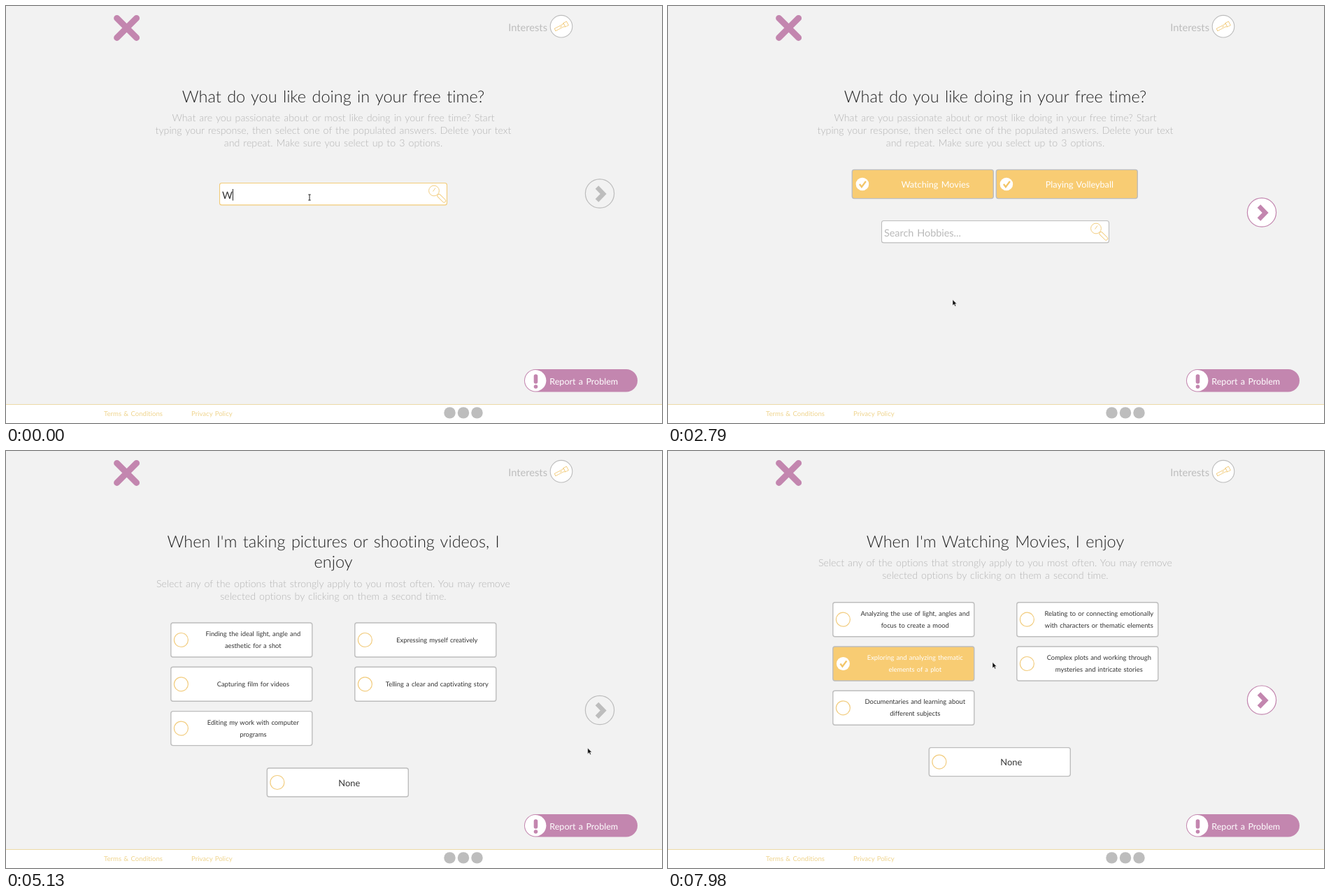
An HTML page for the animation above (8 s loop, 938 px wide and 597 px high).

```html
<!DOCTYPE html>
<html lang="en">
<head>
<meta charset="utf-8">
<title>Interests questionnaire</title>
<style>
  html, body { margin: 0; width: 100%; height: 100%; overflow: hidden; background: #f2f2f2; }
  svg { display: block; width: 100vw; height: 100vh; }
  text { font-family: Lato, "Open Sans", sans-serif; font-variant-ligatures: none; word-spacing: .085em; text-rendering: geometricPrecision; white-space: pre; }
  .mid { text-anchor: middle; }
  .title { font-size: 23.5px; font-weight: 300; fill: #222; }
  .sub { font-size: 14.2px; font-weight: 300; fill: #b4b4b4; }
  .option { font-size: 9.35px; fill: #333; }
  .none { font-size: 12.9px; fill: #333; }
  .hobby { font-size: 12.7px; fill: #fff; }
  .field { font-size: 14.4px; fill: #333; }
  .on { fill: #fff; }
  .link { font-size: 9.6px; fill: #efd48e; }
  .line { fill: none; stroke: #f2cd80; }
</style>
</head>
<body>
<svg viewBox="0 0 938 597" preserveAspectRatio="none"><g id="view"></g><g id="pointer"></g></svg>
<script>
const LOOP = 8000;
const PURPLE = '#c386af', YELLOW = '#f8cc73', GREY = '#bdbdbd';
const view = document.getElementById('view');
const pointer = document.getElementById('pointer');

const ENJOY_HINT = ['Select any of the options that strongly apply to you most often. You may remove',
  'selected options by clicking on them a second time.'];

// rows: [top, height, left label, right label]; picks: [time, option index]
const pages = [
  { start: 0, hobbies: true,
    title: ['What do you like doing in your free time?'],
    hint: ['What are you passionate about or most like doing in your free time? Start',
      'typing your response, then select one of the populated answers. Delete your text',
      'and repeat. Make sure you select up to 3 options.'],
    picks: [[850, 'Watching Movies'], [2450, 'Playing Volleyball']] },
  { start: 3400, narrow: true, cols: [233, 493.2], next: 430,
    title: ['What course material would you be excited to', 'continue learning about?'],
    hint: ['Please select up to 2 disciplines.'],
    rows: [
      [228, 49, 'Psychology, anthropology, sociology,|and criminal justice',
        'English literature, grammar, foreign|languages and writing'],
      [291.3, 49, 'The sciences like biology and|geology',
        'History, historical research, civics,|politics and policy'],
      [354.6, 49, 'Mathematics, statistics, data analysis,|and engineering',
        'Shop, manufacturing, plumbing,|automotive and other ways I can|work with my hands'],
      [427.3, 49, 'Technology, coding, electronics, and|robotics',
        'Business, marketing, finance, product|design, and economics'],
      [490.6, 49, 'Philosophy, religion and spirituality',
        'The arts like photography, design,|theater, and music']],
    picks: [[4420, 9]] },
  { start: 4960, cols: [235.8, 498.8], next: 371, none: 454,
    title: ["When I'm taking pictures or shooting videos, I", 'enjoy'],
    hint: ENJOY_HINT,
    rows: [
      [246, 49, 'Finding the ideal light, angle and|aesthetic for a shot', 'Expressing myself creatively'],
      [309.3, 49, 'Capturing film for videos', 'Telling a clear and captivating story'],
      [372.6, 49, 'Editing my work with computer|programs']],
    picks: [[5980, 1], [6450, 4]] },
  { start: 7040, cols: [235.8, 498.8], next: 356.6, none: 424.6,
    title: ["When I'm Watching Movies, I enjoy"],
    hint: ENJOY_HINT,
    rows: [
      [216.7, 49, 'Analyzing the use of light, angles and|focus to create a mood',
        'Relating to or connecting emotionally|with characters or thematic elements'],
      [280, 49, 'Exploring and analyzing thematic|elements of a plot',
        'Complex plots and working through|mysteries and intricate stories'],
      [343.3, 49, 'Documentaries and learning about|different subjects']],
    picks: [[7580, 2]] }
];

const path = [
  [0, 434, 274], [350, 434, 274], [750, 455, 320], [950, 455, 318], [1300, 417, 325], [1950, 417, 325],
  [2350, 440, 380], [2500, 440, 380], [2790, 408, 425], [3250, 848, 300], [3450, 848, 300],
  [4150, 640, 517], [4500, 640, 517], [4850, 835, 432], [5020, 835, 432], [5520, 817, 415],
  [5880, 600, 275], [6040, 600, 275], [6380, 340, 400], [6500, 340, 400], [6880, 838, 363],
  [7080, 838, 363], [7500, 340, 306], [7650, 340, 306], [7980, 465, 307], [8000, 465, 307]];

const typing = [[0, 780, 'Watch', 150], [1450, 2450, 'Playing V', 95]];

const text = (x, y, s, cls) => `<text x="${x}" y="${y}" class="${cls}">${s.replace('&', '&amp;')}</text>`;
const lines = (x, y, list, step, cls) => list.map((s, i) => text(x, y + i * step, s, 'mid ' + cls)).join('');
const circle = (x, y, r, attrs) => `<circle cx="${x}" cy="${y}" r="${r}" ${attrs}/>`;
const box = (x, y, w, h, attrs) => `<rect x="${x}" y="${y}" width="${w}" height="${h}" ${attrs}/>`;
const tick = (x, y, width) =>
  `<path d="M${x - 4} ${y}l3 4 6-8" fill="none" stroke="#f3c567" stroke-width="${width}"/>`;
const inside = (p, x, y, w, h) => p.x >= x && p.x <= x + w && p.y >= y && p.y <= y + h;

function cursorAt(t) {
  const i = path.findIndex(k => k[0] > t);
  const [t0, x0, y0] = path[i - 1], [t1, x1, y1] = path[i];
  const u = (t - t0) / (t1 - t0), e = u * u * (3 - 2 * u);
  return { x: x0 + (x1 - x0) * e, y: y0 + (y1 - y0) * e, kind: 'arrow' };
}

function card(x, y, h, label, selected, p, cls = 'option') {
  const hover = inside(p, x, y, 202, h), cy = y + h / 2, rows = label.split('|');
  if (hover) p.kind = 'hand';
  const mark = selected
    ? circle(x + 14.6, cy, 9.5, 'fill="#fff"') + tick(x + 14.6, cy, 2.3)
    : circle(x + 14.6, cy, 10, 'class="line" stroke-width="1.2"') + (hover ? tick(x + 13.6, cy - 1, 2.3) : '');
  const base = cy + (cls === 'option' ? 3 : 5) - (rows.length - 1) * 8.4;
  return box(x, y, 202, h, `rx="3" fill="${selected ? YELLOW : '#fff'}" stroke="${GREY}" stroke-width="1.4"`) +
    mark + lines(x + 117.5, base, rows, 16.8, cls + (selected ? ' on' : ''));
}

function nextButton(x, y, enabled, p) {
  const hover = enabled && Math.hypot(p.x - x, p.y - y) < 20;
  if (hover) p.kind = 'hand';
  const color = !enabled ? GREY : hover ? '#79566d' : PURPLE;
  return circle(x, y, 20.6, `fill="${enabled ? '#fff' : '#f2f2f2'}" stroke="${color}" stroke-width="1.2"`) +
    `<path d="M${x - 4} ${y - 9}l9.2 9.5-9.2 9.5" fill="none" stroke="${color}" stroke-width="6.4"/>`;
}

function frameParts(k) {
  const report = 741 * k - .8 * (k < 1);
  return `<g transform="translate(${172.6 * k} 31.4)" stroke="${PURPLE}" stroke-width="9" stroke-linecap="round">
      <path d="M-14-14L14 14M14-14L-14 14"/></g>` +
    `<text x="${774 * k}" y="36" font-size="14.7" fill="${GREY}" text-anchor="end">Interests</text>` +
    circle(794 * k, 29.2, 15.8, `fill="#fff" stroke="${GREY}" stroke-width="1.1"`) +
    `<g transform="translate(${794 * k} 29.4) rotate(-27)" class="line">
      <path d="M-10-1.8h13l2-1.3h5v6.2h-5l-2-1.3h-13zM5-3v6M-2 0h3" stroke-width=".9"/></g>` +
    box(report, 520, 162, 32.6, `rx="16.3" fill="${PURPLE}"`) +
    circle(report + 16.2, 536.3, 15.2, 'fill="#fff"') +
    `<path d="M${report + 16.5} 530v8" stroke="${PURPLE}" stroke-width="5.6" stroke-linecap="round"/>` +
    circle(report + 16.5, 545, 2.8, `fill="${PURPLE}"`) +
    `<text x="${report + 36.3}" y="542" font-size="12.55" fill="#fff">Report a Problem</text>` +
    box(0, 571, 938, 26, 'fill="#fff"') + box(0, 570, 938, 1, 'fill="#ecd9a6"') +
    text(140 * k, 587.2, 'Terms & Conditions', 'link') + text(265 * k, 587.2, 'Privacy Policy', 'link') +
    [634.5, 654, 673.5].map(x => circle(x * k, 582.4, 8.2, `fill="${GREY}"`)).join('');
}

function searchField(t, y, p) {
  const run = typing.find(r => t >= r[0] && t < r[1]);
  const typed = run ? run[2].slice(0, 1 + Math.floor((t - run[0]) / run[3])) : '';
  const focus = t < 850 || (t >= 1200 && t < 2450);
  if (inside(p, 305, y, 325, 32)) p.kind = 'ibeam';
  return box(305.5, y + .5, 325, 31.4, `rx="3" fill="#fff" stroke="${focus ? '#f2cb78' : GREY}" stroke-width="1.1"`) +
    `<text id="entry" x="309" y="${y + 22.6}" class="field" ${focus ? '' : 'style="fill:#b9b9b9"'}>${typed || 'Search Hobbies...'}</text>` +
    (focus ? `<path id="caret" data-typed="${typed}" d="M309.5 ${y + 9}v16.5" stroke="#222"/>` : '') +
    `<g transform="translate(612 ${y + 11.5})" class="line">${circle(0, 0, 7.4, '')}
      <path d="M-1.5 1L2-4"/><rect x="8" y="-2.3" width="14.5" height="4.6" rx="1.8" transform="rotate(45)"/></g>`;
}

function hobbyPage(t, picked, p) {
  const left = 468.3 - picked.length * 103 + 1;
  const y = picked.length ? 307 : 253;
  return picked.map((name, i) => {
    const x = left + i * 206;
    return box(x, 234.4, 202, 41.2, `rx="3" fill="${YELLOW}" stroke="${GREY}" stroke-width="1.4"`) +
      circle(x + 14.6, 255, 9.3, 'fill="#fff"') + tick(x + 14.6, 255, 2.3) +
      text(x + 119, 260, name, 'mid hobby');
  }).join('') + searchField(t, y, p) + nextButton(849, picked.length ? 295.5 : 268.5, picked.length > 0, p);
}

function optionPage(page, picked, k, p) {
  const cards = page.rows.map(([y, h, ...labels], row) => labels.map((label, col) => {
    const tall = label.split('|').length > 2 ? 10 : 0;
    return card(page.cols[col], y, h + tall, label, picked.includes(row * 2 + col), p);
  }).join('')).join('');
  return cards + (page.none ? card(373.3, page.none, 41, 'None', false, p, 'none') : '') +
    nextButton(849 * k, page.next, picked.length > 0, p);
}

function pageMarkup(t, p) {
  const page = pages.findLast(q => t >= q.start);
  const picked = page.picks.filter(q => t >= q[0]).map(q => q[1]);
  const k = page.narrow ? .992 : 1, mid = 468 * k;
  const hintY = 165.2 + (page.title.length - 1) * 29.3;
  return frameParts(k) + lines(mid, 137.8, page.title, 29.3, 'title') + lines(mid, hintY, page.hint, 18, 'sub') +
    (page.hobbies ? hobbyPage(t, picked, p) : optionPage(page, picked, k, p)) +
    (page.narrow ? box(933, 0, 5, 597, 'fill="#fafafa"') + box(935, 1, 3, 532, 'rx="1.5" fill="#c1c1c1"') : '');
}

const shapes = {
  arrow: '<path d="M-1-4.5v8.3l2-1.8 1.4 3 1.4-.7-1.4-2.8h2.5z" fill="#111" stroke="#fff" stroke-width=".5"/>',
  ibeam: '<path d="M-1.7-4h3.4M-1.7 4h3.4M0-4v8" fill="none" stroke="#222"/>',
  hand: '<path d="M-2.5-4.5q1.2-.8 1.6.5l.6 2 4 .8q1 .5.7 2l-.6 3.7h-4.6l-3-4q0-1.2 1.8-.2z" fill="#fff" stroke="#222" stroke-width=".9"/>' +
    '<path d="M.3 1v2M2.2 1v2" stroke="#222" stroke-width=".7"/>'
};

let last = '';
function render(t) {
  const p = cursorAt(t), markup = pageMarkup(t, p);
  if (markup !== last) {
    view.innerHTML = last = markup;
    const caret = document.getElementById('caret');
    if (caret && caret.dataset.typed) {
      caret.setAttribute('transform', `translate(${document.getElementById('entry').getComputedTextLength()} 0)`);
    }
  }
  pointer.innerHTML = shapes[p.kind];
  pointer.setAttribute('transform', `translate(${p.x} ${p.y})`);
}

const began = performance.now();
function loop() {
  render((performance.now() - began) % LOOP);
  requestAnimationFrame(loop);
}
loop();
</script>
</body>
</html>
```
